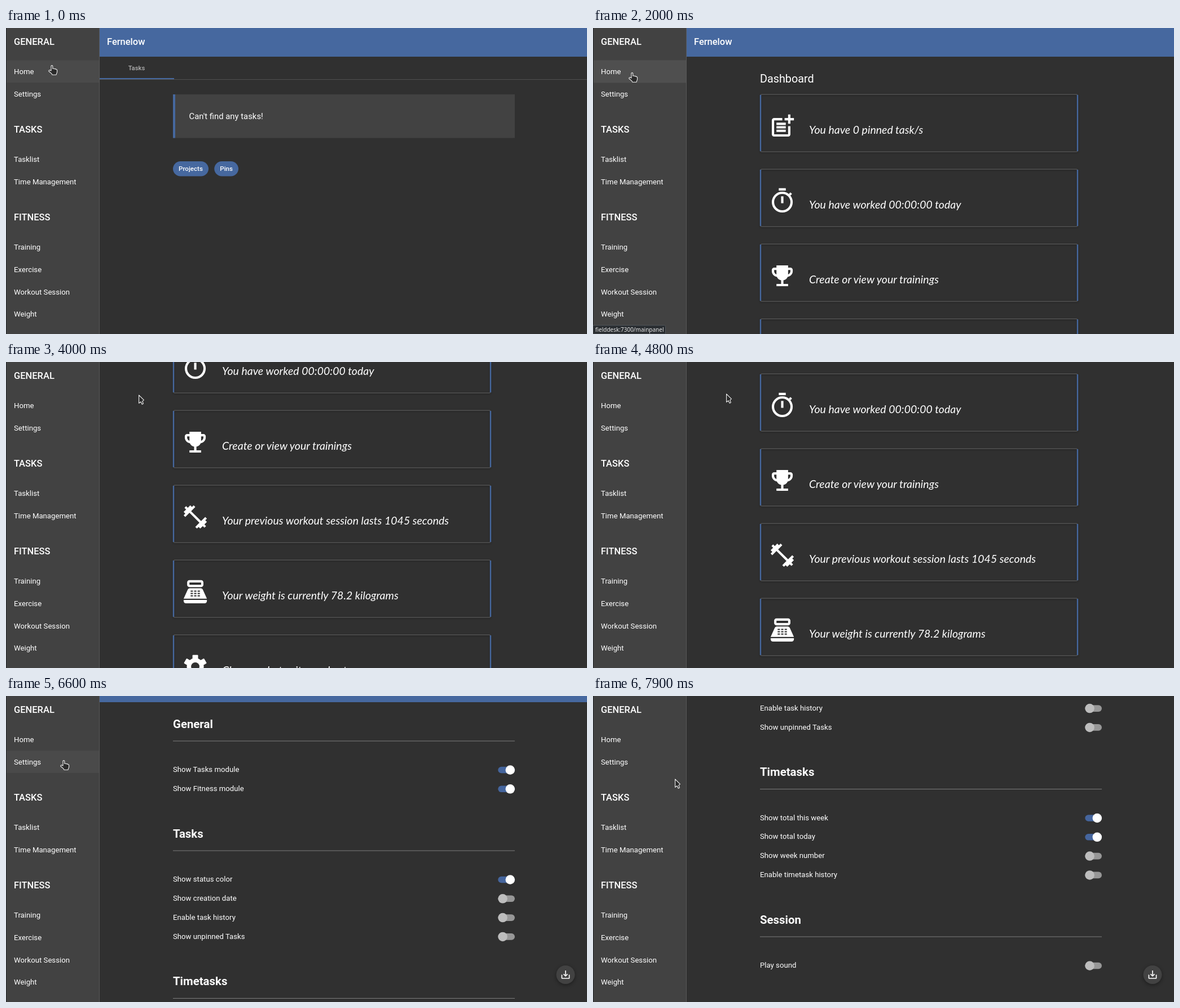
Animation, 1030 px wide and 544 px high, one loop 8000 ms. Source, as an HTML page:

```html
<!DOCTYPE html>
<html lang="en">
<head>
<meta charset="utf-8">
<title>Task and fitness planner</title>
<style>
html, body { margin: 0; width: 100%; height: 100%; overflow: hidden; background: #303030; }
svg { display: block; }
text { font-family: Roboto, sans-serif; fill: #fff; white-space: pre; }
.note { font-family: Lato, sans-serif; font-style: italic; }
.url { font-family: "Noto Sans", sans-serif; fill: #e6e6e6; }
.card { filter: drop-shadow(0 1px 1.5px rgba(0, 0, 0, .3)); }
.fab { filter: drop-shadow(0 2px 3px rgba(0, 0, 0, .4)); }

.anim { animation: 8s step-end infinite; }
#scroll { animation-name: scroll; }
#home { animation-name: home; }
#dashboard { animation-name: dashboard; }
#settings, #fab { animation-name: settings; }
#cursor { animation-name: cursor; }
#hand { animation-name: hand; }
#arrow { animation-name: arrow; }
#hoverHome { animation-name: hoverHome; }
#hoverSettings { animation-name: hoverSettings; }
#urlHome { animation-name: urlHome; }
#urlSettings { animation-name: urlSettings; }
#ripple { animation: ripple 8s linear infinite; }

@keyframes scroll {
  0% { transform: translateY(0); }
  37.5% { transform: translateY(-139px); }
  40% { transform: translateY(-141px); }
  47.5% { transform: translateY(-142px); }
  50% { transform: translateY(-298px); }
  52.5% { transform: translateY(-369px); }
  60% { transform: translateY(-230px); }
  62.5% { transform: translateY(-40px); }
  87.5% { transform: translateY(-45px); }
  90% { transform: translateY(-162px); }
  91.25% { transform: translateY(-228px); }
  95% { transform: translateY(-372px); }
  98.75%, 100% { transform: translateY(-412px); }
}
@keyframes home { 0% { opacity: 1; } 18.75%, 100% { opacity: 0; } }
@keyframes dashboard { 0% { opacity: 0; } 18.75% { opacity: 1; } 81.25%, 100% { opacity: 0; } }
@keyframes settings { 0% { opacity: 0; } 81.25%, 100% { opacity: 1; } }
@keyframes cursor {
  0% { transform: translate(75px, 66px); }
  1.25% { transform: translate(68px, 76px); }
  3.75% { transform: translate(63px, 79px); }
  26.25% { transform: translate(180px, 105px); }
  27.5% { transform: translate(255px, 125px); }
  28.75% { transform: translate(280px, 120px); }
  37.5% { transform: translate(265px, 128px); }
  40% { transform: translate(222px, 70px); }
  42.5% { transform: translate(140px, 72px); }
  43.75% { transform: translate(115px, 76px); }
  46.25% { transform: translate(190px, 64px); }
  47.5% { transform: translate(235px, 58px); }
  57.5% { transform: translate(236px, 56px); }
  65% { transform: translate(246px, 56px); }
  67.5% { transform: translate(159px, 73px); }
  71.25% { transform: translate(97px, 112px); }
  73.75% { transform: translate(96px, 114px); }
  85% { transform: translate(308px, 157px); }
  87.5% { transform: translate(320px, 152px); }
  98.75%, 100% { transform: translate(145px, 147px); }
}
@keyframes hand {
  0%, 42.5%, 71.25% { opacity: 1; }
  26.25%, 46.25%, 85%, 100% { opacity: 0; }
}
@keyframes arrow {
  0%, 42.5%, 71.25% { opacity: 0; }
  26.25%, 46.25%, 85%, 100% { opacity: 1; }
}
@keyframes hoverHome {
  0%, 42.5% { opacity: 1; }
  26.25%, 46.25%, 100% { opacity: 0; }
}
@keyframes hoverSettings { 0% { opacity: 0; } 71.25% { opacity: 1; } 85%, 100% { opacity: 0; } }
@keyframes urlHome {
  0% { opacity: 0; }
  6.25% { opacity: .5; }
  7.5% { opacity: 1; }
  26.25% { opacity: .5; }
  27.5% { opacity: 0; }
  43.75% { opacity: .3; }
  50%, 100% { opacity: 0; }
}
@keyframes urlSettings {
  0% { opacity: 0; }
  73.75% { opacity: 1; }
  81.25% { opacity: .5; }
  82.5%, 100% { opacity: 0; }
}
@keyframes ripple {
  0%, 17.5% { transform: scale(0); opacity: .06; }
  23% { transform: scale(1); opacity: .06; }
  27.5%, 100% { transform: scale(1); opacity: 0; }
}
</style>
</head>
<body>
<script>
const BLUE = '#46689f', BACK = '#303030', PANEL = '#424242';

// y is the middle of the capital letters
const text = (x, y, size, str, extra = '') =>
  `<text x="${x}" y="${y + size * .355}" font-size="${size}" ${extra}>${str}</text>`;
const rect = (x, y, w, h, fill, extra = '') =>
  `<rect x="${x}" y="${y}" width="${w}" height="${h}" fill="${fill}" ${extra}/>`;
const layer = (id, body) => `<g id="${id}" class="anim">${body}</g>`;
const path = d => `<path d="${d}"/>`;

const keys = [8, 11, 14].flatMap(x => [11, 13, 15].map(y => rect(x, y, 2, 1, BACK))).join('');
const teeth = [0, 60, 120].map(a =>
  rect(9.6, 2, 4.8, 20, '#fff', `rx=".5" transform="rotate(${a} 12 12)"`)).join('');

const icons = {
  post: path('M17 19H5V7h7V5H5c-1.1 0-2 .9-2 2v12c0 1.1.9 2 2 2h12c1.1 0 2-.9 2-2v-7h-2zM19 2h-2v3h-3v2h3v3h2V7h3V5h-3zM7 9h8v2H7zM7 12h8v2H7zM7 15h8v2H7z'),
  timer: path('M9 1h6v2H9zM11 8h2v6h-2zM17.6 6l1.4-1.4 1.4 1.4L19 7.4z') +
    '<circle cx="12" cy="13" r="8" fill="none" stroke="#fff" stroke-width="2"/>',
  cup: path('M19 5h-2V3H7v2H5c-1.1 0-2 .9-2 2v1c0 2.55 1.92 4.63 4.39 4.94.63 1.5 1.98 2.63 3.61 2.96V19H7v2h10v-2h-4v-3.1c1.63-.33 2.98-1.46 3.61-2.96C19.08 12.63 21 10.55 21 8V7c0-1.1-.9-2-2-2zM5 8V7h2v3.82C5.84 10.4 5 9.3 5 8zm14 0c0 1.3-.84 2.4-2 2.82V7h2z'),
  dumbbell: path('M20.57 14.86L22 13.43 20.57 12 17 15.57 8.43 7 12 3.43 10.57 2 9.14 3.43 7.71 2 5.57 4.14 4.14 2.71 2.71 4.14l1.43 1.43L2 7.71l1.43 1.43L2 10.57 3.43 12 7 8.43 15.57 17 12 20.57 13.43 22l1.43-1.43L16.29 22l2.14-2.14 1.43 1.43 1.43-1.43-1.43-1.43L22 16.29z'),
  scale: path('M17 2H7c-1.1 0-2 .9-2 2v2c0 1.1.9 2 2 2h10c1.1 0 2-.9 2-2V4c0-1.1-.9-2-2-2zm0 4H7V4h10zM2 19h20v1c0 1.1-.9 2-2 2H4c-1.1 0-2-.9-2-2zM18.5 10.2C18.2 9.5 17.5 9 16.7 9H7.3c-.8 0-1.5.5-1.8 1.2L2 18h20z') + keys,
  gear: `${teeth}<circle cx="12" cy="12" r="7.3"/><circle cx="12" cy="12" r="3.6" fill="${BACK}"/>`
};

const card = (icon, label, i) => `<g transform="translate(0 ${118 + 133 * i})">
  <g class="card" fill="none" stroke-width="2">
    <rect x="297" y="0" width="562" height="102" rx="2.5" stroke="#484848"/>
    <path d="M297 1V101M859 1V101" stroke="${BLUE}" stroke-width="2.4"/>
  </g>
  <g fill="#fff" transform="translate(310.8 31.7) scale(2.0625)">${icons[icon]}</g>
  <text class="note" x="383" y="70" font-size="19.5">${label}</text></g>`;

const toggle = (y, on) =>
  rect(872.3, y - 5.8, 29.7, 11.6, on ? '#45659d' : '#979797', 'rx="5.8"') +
  `<circle cx="${on ? 893.8 : 880.6}" cy="${y}" r="8.25" fill="${on ? '#fff' : '#bdbdbd'}"/>`;

// A leading + marks a switch that is on
const section = (y, title, rows) =>
  text(296, y, 20.4, title, 'font-weight="700"') + rect(296, y + 30, 606, 1, '#7c7c7c') +
  rows.map((row, i) => {
    const mid = y + 81 + 33.8 * i, on = row[0] === '+';
    return text(296, mid, 13.2, on ? row.slice(1) : row) + toggle(mid + 1, on);
  }).join('');

const chip = (x, w, label) => rect(x, 237, w, 26.5, BLUE, 'rx="13.25"') +
  text(x + w / 2, 250, 11.55, label, 'font-weight="500" text-anchor="middle"');

const menu = (y, title, items) => text(14, y, 16.5, title, 'font-weight="500"') +
  items.map((item, i) => text(14, y + 53.2 + 39.65 * i, 13.2, item)).join('');

const status = (w, url) =>
  `<path d="M0 528.5H${w - 2.5}q2 0 2 2V544H0z" fill="#2a2e32" stroke="#50555a"/>
  <text class="url" x="4" y="540" font-size="10">${url}</text>`;

const home =
  text(231.5, 71, 11.3, 'Tasks', 'font-weight="500" text-anchor="middle" opacity=".62"') +
  rect(166, 91, 864, 1, '#505050') + rect(166, 89, 132, 2, BLUE) +
  rect(296, 118, 606, 77.5, PANEL) + rect(296, 118, 4, 77.5, BLUE) +
  text(324.5, 156.5, 14.85, "Can't find any tasks!") +
  chip(296, 63, 'Projects') + chip(369.3, 42.7, 'Pins');

const dashboard = text(296, 90, 19.8, 'Dashboard') + [
  ['post', 'You have 0 pinned task/s'],
  ['timer', 'You have worked 00:00:00 today'],
  ['cup', 'Create or view your trainings'],
  ['dumbbell', 'Your previous workout session lasts 1045 seconds'],
  ['scale', 'Your weight is currently 78.2 kilograms'],
  ['gear', 'Change what suits you best']
].map(([icon, label], i) => card(icon, label, i)).join('');

const settings =
  section(89.5, 'General', ['+Show Tasks module', '+Show Fitness module']) +
  section(284.5, 'Tasks', ['+Show status color', 'Show creation date', 'Enable task history', 'Show unpinned Tasks']) +
  section(547, 'Timetasks', ['+Show total this week', '+Show total today', 'Show week number', 'Enable timetask history']) +
  section(809.5, 'Session', ['Play sound']);

const fab = `<circle class="fab" cx="992" cy="495.5" r="16.5" fill="${PANEL}"/>
  <g fill="#fff" transform="translate(982.1 485.5) scale(.825)">${path('M19 12v7H5v-7H3v7c0 1.1.9 2 2 2h14c1.1 0 2-.9 2-2v-7zm-6 .67l2.59-2.58L17 11.5l-5 5-5-5 1.41-1.41L11 12.67V3h2z')}</g>`;

const sidebar = rect(0, 0, 165, 544, PANEL) + rect(165, 0, 1, 544, '#575757') +
  layer('hoverHome', rect(1, 57.5, 164, 39.6, '#4a4a4a')) +
  layer('hoverSettings', rect(1, 97.2, 164, 39.6, '#4a4a4a')) +
  `<clipPath id="row">${rect(1, 57.5, 164, 39.6, '#fff')}</clipPath>
  <g clip-path="url(#row)"><g transform="translate(70 82)"><circle id="ripple" r="100" fill="#fff"/></g></g>` +
  menu(24.5, 'GENERAL', ['Home', 'Settings']) +
  menu(180.5, 'TASKS', ['Tasklist', 'Time Management']) +
  menu(336.5, 'FITNESS', ['Training', 'Exercise', 'Workout Session', 'Weight']) +
  rect(0, 0, 1, 544, '#24282c');

const cursor = `<g fill="#2b2b2b" stroke="#f2f2f2" stroke-width="1.1" stroke-linejoin="round">` +
  layer('hand', path('M5 10V2Q5 .6 6.4 .6T7.8 2V6.3Q10 5.6 11 6.8Q13 6.3 13.8 7.6Q15.6 7.4 15.6 9.2V12.4L14 17.2H7L5.6 14.8L1 11Q.4 9 2.6 8.8Z')) +
  layer('arrow', path('M.6 .8V15.2L4 12.8L6.2 17.2L8.4 16L6.8 11.8L9.4 9.6Z')) + '</g>';

document.body.innerHTML = `<svg width="1030" height="544" viewBox="0 0 1030 544">` +
  rect(0, 0, 1030, 544, BACK) +
  layer('scroll',
    rect(166, 0, 864, 51, BLUE) + text(179, 24.5, 16.5, 'Fernelow', 'font-weight="500"') +
    layer('home', home) + layer('dashboard', dashboard) + layer('settings', settings)) +
  layer('fab', fab) + sidebar +
  layer('urlHome', status(129, 'fielddesk:7300/mainpanel')) +
  layer('urlSettings', status(116, 'fielddesk:7300/controls')) +
  layer('cursor', cursor) + '</svg>';
</script>
</body>
</html>
```
